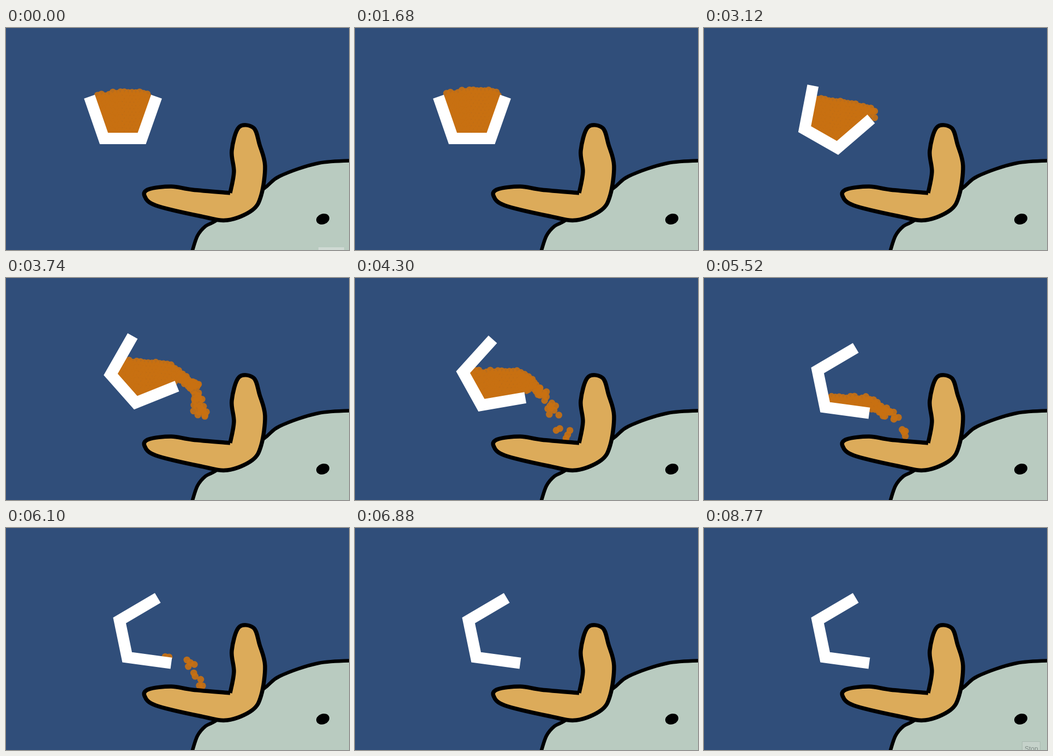
Animation of 629 by 409 pixels, one loop 8790 ms. Source, as an HTML page with a canvas:

```html
<!DOCTYPE html>
<html>
<head>
<meta charset="utf-8">
<style>
html, body { margin: 0; width: 100%; height: 100%; overflow: hidden; background: #304e7a; }
canvas { display: block; }
</style>
</head>
<body>
<canvas id="stage" width="629" height="409"></canvas>
<script>
const ctx = document.getElementById('stage').getContext('2d');
const LOOP = 8790;
const PIVOT = { x: 214.3, y: 204.4 };
const LIP = { x: 266, y: 123 };
const SPACING = 7;

const rnd = n => { const v = Math.sin(n * 127.1 + 3.7) * 43758.5453; return v - Math.floor(v); };
const clamp = v => Math.max(0, Math.min(1, v));
const mix = (a, b, u) => a + (b - a) * u;
const ramp = (t, from, to) => clamp((t - from) / (to - from));

// The cup tips quickly, then more slowly.
const tilt = t => (56.5 * ramp(t, 2140, 4000) + 21.9 * ramp(t, 4000, 5480)) * Math.PI / 180;

function rotate({ x, y }, angle) {
  const c = Math.cos(angle), s = Math.sin(angle);
  const dx = x - PIVOT.x, dy = y - PIVOT.y;
  return { x: PIVOT.x + dx * c - dy * s, y: PIVOT.y + dx * s + dy * c };
}

// Height of the pile over time: [time, y].
const LEVELS = [[490, 118.5], [1300, 115], [2140, 115], [3120, 131], [4300, 172], [5520, 220], [6500, 252]];
function level(t) {
  let y = LEVELS[0][1];
  for (let i = 1; i < LEVELS.length; i++) {
    const [t0, y0] = LEVELS[i - 1], [t1, y1] = LEVELS[i];
    y += (y1 - y0) * ramp(t, t0, t1);
  }
  return y;
}
// Domed at rest, leaning while the cup turns, bending down past the lip.
function surface(x, t) {
  const dome = 0.0025 * (1 - ramp(t, 2140, 2740));
  const lean = 0.16 * (ramp(t, 2140, 3120) - ramp(t, 3120, 4300));
  const bend = 0.013 * ramp(t, 2140, 3120);
  return level(t) + dome * (x - 222) ** 2 + lean * (x - 214) + bend * Math.max(0, x - 290) ** 2;
}
const overhang = t => 30 * ramp(t, 2600, 3600);

function insideCup(p) {
  return p.y < 197 && Math.abs(p.x - 214.5) < 30 + (193 - p.y) * 0.343;
}

// Balls leaving the cup; each follows a parabola.
const drops = Array.from({ length: 95 }, (_, k) => {
  const start = 3150 + 3250 * (k / 95) ** 1.6;
  const lip = rotate(LIP, tilt(start));
  const x = lip.x + overhang(start) * mix(0.7, 1.1, rnd(k));
  return {
    start, x,
    y: Math.min(surface(x, start), lip.y) + 16 * rnd(k + 200),
    vx: mix(40, 90, rnd(k + 400)),
    vy: mix(0, 25, rnd(k + 600))
  };
});

// Smooth curve through a few points given as x, y, x, y, ...
function curve(...xy) {
  const points = [];
  for (let i = 0; i < xy.length; i += 2) points.push([xy[i], xy[i + 1]]);
  const path = new Path2D();
  path.moveTo(...points[0]);
  for (let i = 0; i < points.length - 1; i++) {
    const p = points[i], q = points[i + 1];
    const before = points[i - 1] || p, after = points[i + 2] || q;
    path.bezierCurveTo(
      p[0] + (q[0] - before[0]) / 6, p[1] + (q[1] - before[1]) / 6,
      q[0] - (after[0] - p[0]) / 6, q[1] - (after[1] - p[1]) / 6, ...q);
  }
  return path;
}
const head = curve(645,244, 573,249, 502,273, 470,298, 388,353, 366,365, 351,383, 341,413);
head.lineTo(645, 420);
head.closePath();
const beak = curve(411,304, 342,298, 303,292, 262,297, 254,309, 275,327, 358,347, 406,354,
  451,336, 468,308, 475,254, 465,215, 454,184, 427,183, 414,226, 418,265, 411,304);

function outlined(path, fill, width) {
  ctx.fillStyle = fill;
  ctx.fill(path);
  ctx.strokeStyle = '#000';
  ctx.lineWidth = width;
  ctx.lineJoin = 'round';
  ctx.stroke(path);
}
function ball(x, y) {
  ctx.fillStyle = 'rgba(200,112,18,.91)';
  ctx.beginPath();
  ctx.arc(x, y, 6.3, 0, 7);
  ctx.fill();
}

function drawPile(t) {
  const angle = tilt(t), lip = rotate(LIP, angle);
  const end = lip.x + overhang(t);
  const spill = 20 * clamp((lip.y - surface(lip.x, t)) / 16);
  const drift = 40 * Math.max(0, t - 3000) / 1000;
  const first = Math.floor((150 - drift) / SPACING);
  for (let k = first; k * SPACING + drift < end; k++) {
    const column = k * SPACING + drift;
    const top = surface(column, t) + 5 * rnd(k + 900) - 2.5;
    for (let row = 0; row < 16; row++) {
      const x = column + (row % 2) * SPACING / 2, y = top + row * 6;
      const overLip = x > lip.x && row * 6 < spill;
      if (x < end && (overLip || insideCup(rotate({ x, y }, -angle)))) ball(x, y);
    }
  }
}
function drawDrops(t) {
  for (const d of drops) {
    const s = (t - d.start) / 1000;
    const y = d.y + d.vy * s + 240 * s * s;
    if (s > 0 && y < 312) ball(d.x + d.vx * s, y);
  }
}
function drawCup(t) {
  const [a, b, c, d] = [[153, 126.5], [179.5, 203.5], [249, 203.5], [276, 126.5]]
    .map(([x, y]) => rotate({ x, y }, tilt(t)));
  ctx.strokeStyle = '#fff';
  ctx.lineWidth = 21;
  ctx.lineJoin = 'miter';
  ctx.beginPath();
  for (const p of [a, b, c, d]) ctx.lineTo(p.x, p.y);
  ctx.stroke();
}
function drawEye() {
  ctx.fillStyle = '#000';
  ctx.beginPath();
  ctx.ellipse(581, 352, 12.3, 9.7, -0.35, 0, 7);
  ctx.fill();
}
function drawButton(t) {
  if (t < 40) {
    ctx.fillStyle = '#d0dad4';
    ctx.fillRect(573, 404, 47, 5);
    return;
  }
  ctx.globalAlpha = ramp(t, 8500, 8640);
  ctx.fillStyle = '#c5d2ca';
  ctx.fillRect(583, 393, 34, 16);
  ctx.strokeStyle = '#a9b9b0';
  ctx.lineWidth = 1;
  ctx.strokeRect(583.5, 393.5, 33, 20);
  ctx.fillStyle = '#7f8b86';
  ctx.font = '12px "Liberation Sans", sans-serif';
  ctx.fillText('Stop', 588, 411);
  ctx.globalAlpha = 1;
}

function draw(t) {
  ctx.fillStyle = '#304e7a';
  ctx.fillRect(0, 0, 629, 409);
  drawPile(t);
  drawDrops(t);
  drawCup(t);
  outlined(head, '#b9cbc0', 6.5);
  outlined(beak, '#dcab5a', 7.5);
  drawEye();
  drawButton(t);
}
function tick() {
  draw(performance.now() % LOOP);
  requestAnimationFrame(tick);
}
tick();
</script>
</body>
</html>
```
